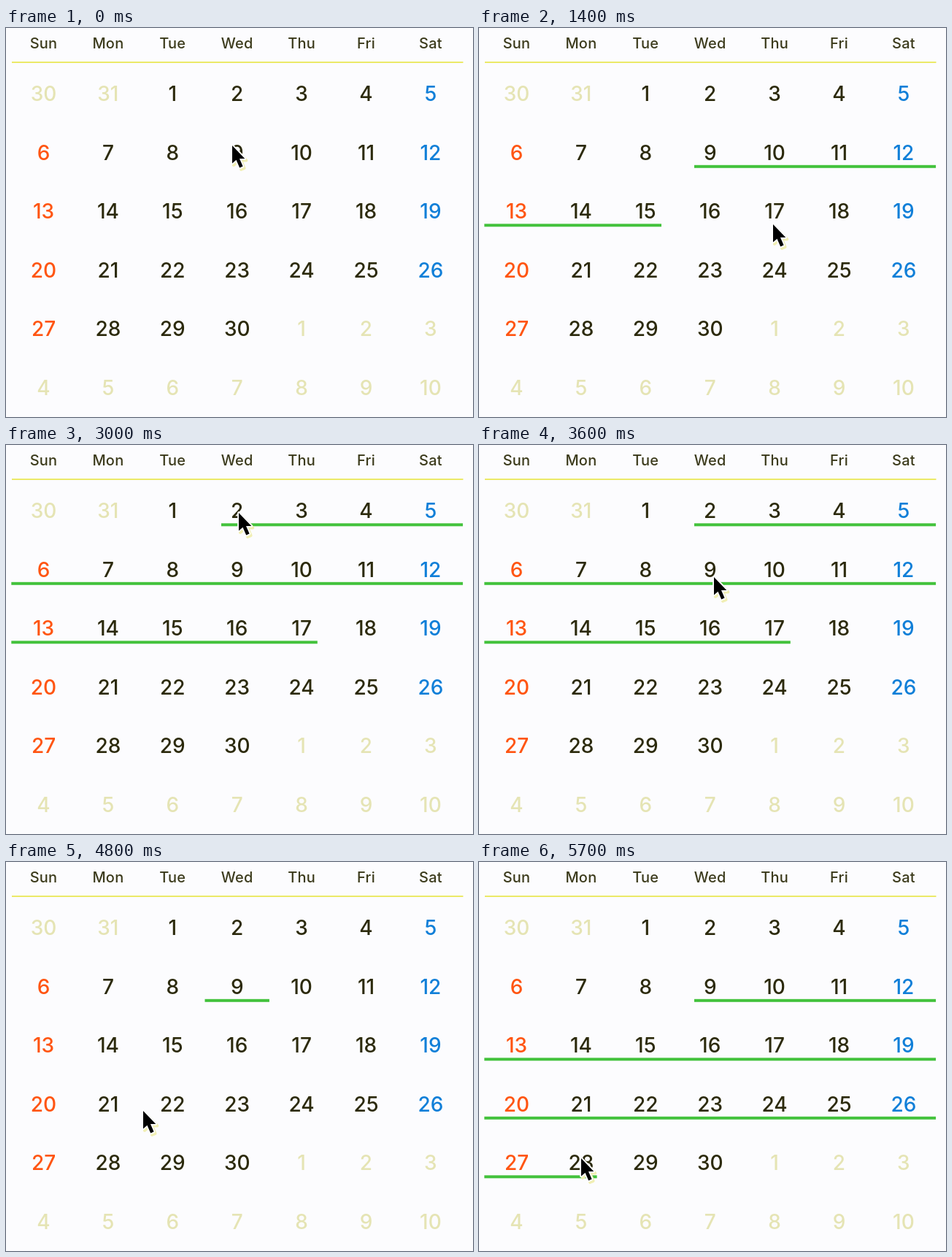
Write an HTML page that moves like this. It is 640x533 px and loops after 5800 ms.

```html
<!DOCTYPE html>
<html lang="en">
<head>
<meta charset="utf-8">
<title>Date range picker</title>
<style>
  html, body { margin: 0; width: 100%; height: 100%; overflow: hidden; background: #fcfcfe; }
  svg { display: block; width: 640px; height: 533px; }
  text { font-family: Inter, "Liberation Sans", sans-serif; font-weight: 500; text-anchor: middle; fill: #2c2a0c; }
  .day { font-size: 28px; }
  .head { font-size: 20px; letter-spacing: .2px; fill: #3c3b1c; }
  .sun { fill: #ff5512; }
  .sat { fill: #107fd8; }
  .muted { fill: #e5e4b4; }
  .mark { fill: #43c23c; }
</style>
</head>
<body>
<svg viewBox="0 0 640 533">
  <rect x="8" y="46" width="618.5" height="2" fill="#ebe968"/>
  <g id="days"></g>
  <g id="marks"></g>
  <g id="cursor">
    <path d="M0 0V24.5L5.5 19.7L10.2 30.5L14.6 28.6L10 18H17.3Z" transform="translate(2 2.5)"
      fill="#f1efb4" stroke="#f1efb4" stroke-width="4" stroke-linejoin="round"/>
    <path d="M0 0V24.5L5.5 19.7L10.2 30.5L14.6 28.6L10 18H17.3Z"
      fill="#000" stroke="#fff" stroke-width="3.6" stroke-linejoin="round" paint-order="stroke"/>
  </g>
</svg>
<script>
const LOOP = 5800, STEP = 100;
const COL = 88.4, ROW = 80.5, LEFT = 7.3, INSET = 22.5;
const $ = id => document.getElementById(id);

function add(parent, tag, attrs, text) {
  const el = document.createElementNS('http://www.w3.org/2000/svg', tag);
  for (const k in attrs) el.setAttribute(k, attrs[k]);
  if (text !== undefined) el.textContent = text;
  parent.append(el);
  return el;
}

const centre = col => LEFT + COL * (col + 0.5);

['Sun', 'Mon', 'Tue', 'Wed', 'Thu', 'Fri', 'Sat'].forEach((name, i) =>
  add($('days'), 'text', { class: 'head', x: centre(i), y: 28 }, name));

// The month starts on cell 2 and has 30 days; the month before has 31.
for (let i = 0; i < 42; i++) {
  const day = i - 1, col = i % 7;
  const muted = day < 1 || day > 30;
  const kind = muted ? 'muted' : col === 0 ? 'sun' : col === 6 ? 'sat' : '';
  const label = day < 1 ? day + 31 : day > 30 ? day - 30 : day;
  add($('days'), 'text', { class: 'day ' + kind, x: centre(col), y: 100 + ROW * Math.floor(i / 7) }, label);
}

const bars = Array.from({ length: 6 }, (_, r) =>
  add($('marks'), 'rect', { class: 'mark', y: 107.3 + ROW * r, height: 4, width: 0 }));

// time, first day, last day
const picks = [
  [0, 0, 0], [300, 9, 9], [1000, 9, 15], [2000, 17, 17],
  [2700, 2, 17], [3900, 9, 9], [5600, 9, 28]
];

// time, x, y of the pointer tip
const path = [
  [0, 309, 160], [400, 309, 161], [800, 222, 260], [1100, 222, 260],
  [1400, 402, 268], [2050, 402, 268], [2400, 336, 110], [2600, 318, 92],
  [3000, 318, 92], [3500, 321, 180], [4300, 321, 180], [4800, 187, 340],
  [5300, 139, 405], [5800, 139, 405]
];

const ease = u => u * u * (3 - 2 * u);

function tip(t) {
  let i = 0;
  while (i < path.length - 2 && path[i + 1][0] <= t) i++;
  const [t0, x0, y0] = path[i], [t1, x1, y1] = path[i + 1];
  const u = ease((t - t0) / (t1 - t0));
  return [x0 + (x1 - x0) * u, y0 + (y1 - y0) * u];
}

function mark(first, last) {
  const a = first + 1, b = last + 1, inset = first === last ? 0 : INSET;
  bars.forEach((bar, r) => {
    const from = Math.max(a, r * 7), to = Math.min(b, r * 7 + 6);
    const show = first > 0 && from <= to;
    const x0 = LEFT + COL * (from - r * 7) + (from === a ? inset : 0);
    const x1 = LEFT + COL * (to - r * 7 + 1) - (to === b ? inset : 0);
    bar.setAttribute('x', x0);
    bar.setAttribute('width', show ? x1 - x0 : 0);
  });
}

function draw(t) {
  const [, first, last] = picks.filter(p => p[0] <= t).pop();
  mark(first, last);
  const [x, y] = tip(t);
  $('cursor').setAttribute('transform', `translate(${x + 1} ${y + 1})`);
}

const start = performance.now();
function tick() {
  const t = (performance.now() - start) % LOOP;
  draw(Math.floor(t / STEP) * STEP);
  requestAnimationFrame(tick);
}
tick();
</script>
</body>
</html>
```
